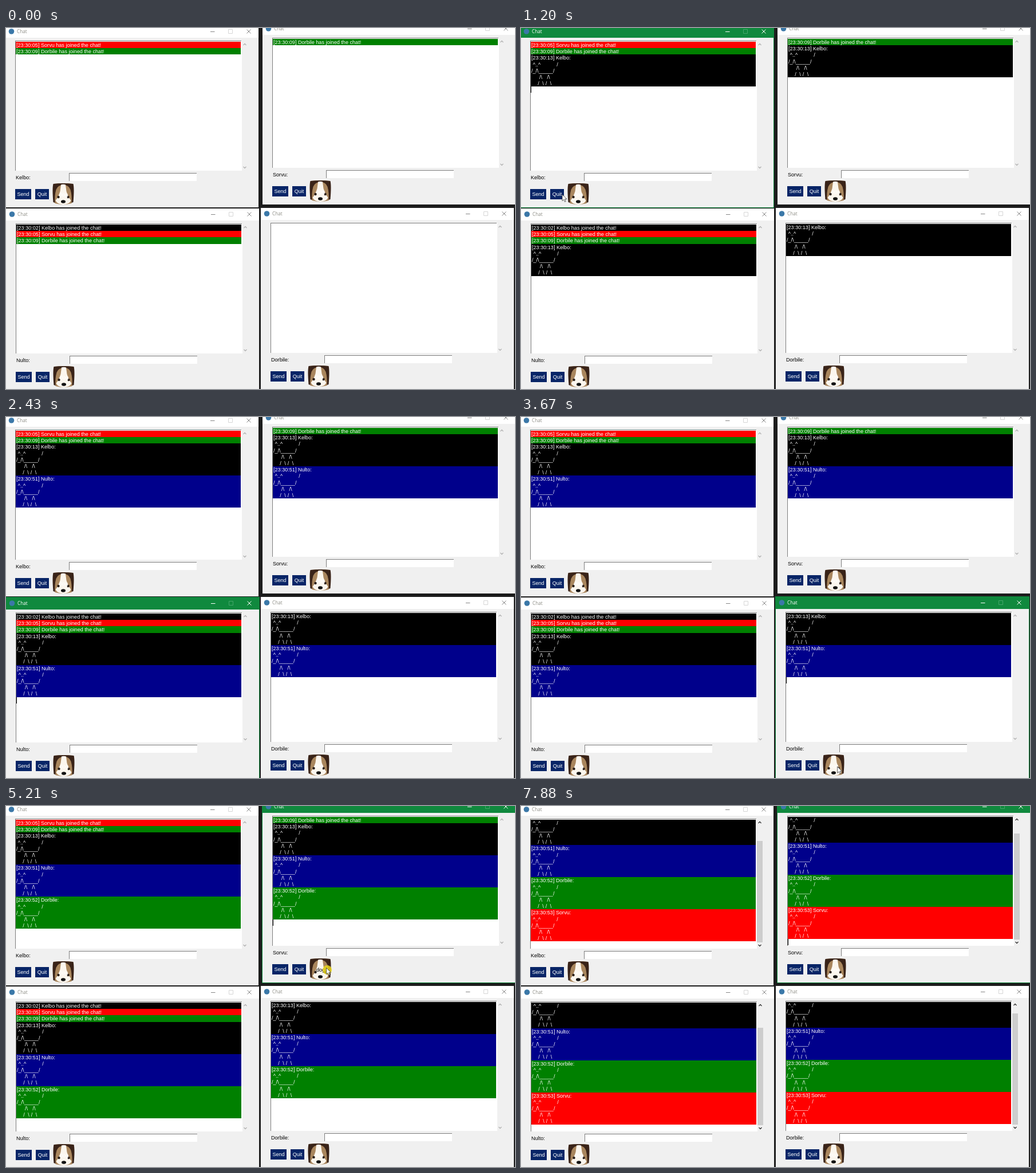
Animation, 889 px wide and 630 px high, one loop 8000 ms. Source, as an HTML page:

```html
<!DOCTYPE html>
<html lang="en">
<head>
<meta charset="utf-8">
<title>Chat</title>
<style>
  html, body { margin: 0; width: 100%; height: 100%; overflow: hidden; background: #1c1c1c; }
  #stage { display: block; width: 889px; height: 630px; }
  text { font: 9.1px "Liberation Sans", Arial, sans-serif; white-space: pre; }
  rect { shape-rendering: crispEdges; }
  .art { fill: #fff; word-spacing: .27px; }
  .light { fill: #fff; }
  .bar { fill: #fff; }
  .title { font: 8.2px "Open Sans", "Noto Sans", sans-serif; fill: #8f8f88; }
  .tool { fill: none; stroke: #858585; }
  .max { stroke: #d6d6d6; }
  .frame { fill: none; stroke: none; }
  .on .bar { fill: #10893e; }
  .on .title { fill: #fff; }
  .on .tool { stroke: #fff; }
  .on .max { stroke: #45a56b; }
  .on .frame { stroke: #10893e; }
  .edge { fill: none; stroke: #7d7d7d; shape-rendering: crispEdges; }
  .arrow { fill: none; stroke-width: 1.3; }
  .dog { fill: #fff; text-anchor: middle; }
  .down .dog { fill: #000; }
  .button { fill: #082567; }
  .mid { text-anchor: middle; fill: #fff; }
</style>
</head>
<body>
<svg id="stage" viewBox="0 0 889 630">
  <defs>
    <g id="face">
      <path fill="#a9865d" d="M2 1Q18.5-1 35 1L36 18L33 35Q18 39 4 35L1 18Z"/>
      <path fill="#392318" d="M1 1Q18.5-1 36 1Q38 9 36 33L33 34Q34 22 31 11Q28 3 19 2.5Q9 3 6 11Q3 22 4 34L1 33Q-1 9 1 1Z"/>
      <path fill="#fbf6ee" d="M14.5 2.5Q18.5 1 22.5 2.5L24 14Q27 24 32 30Q29 37 18.5 37Q8 37 5 30Q10 24 13 14Z"/>
      <circle cx="10" cy="24" r="2.2" fill="#2b2019"/>
      <circle cx="27" cy="24" r="2.2" fill="#2b2019"/>
      <ellipse cx="18.5" cy="32" rx="4" ry="2.7" fill="#111"/>
    </g>
  </defs>
  <g id="windows"></g>
  <g id="pointer">
    <circle id="click" cx="1.5" cy="3.5" r="8" fill="#e8d51c" opacity=".85"/>
    <path d="M0 0V11.2L2.6 8.8L4.4 12.8L6.2 12L4.5 8.1H8Z" fill="#fff" stroke="#222" stroke-width=".7"/>
  </g>
</svg>
<script>
const LOOP = 8000, ROW = 11.2, STEP = 77;
const $ = id => document.getElementById(id);

const users = {
  Kelbo: '#000', Sorvu: '#f00', Dorbile: '#008000', Nulto: '#00008b'
};
const joins = [['02', 'Kelbo'], ['05', 'Sorvu'], ['09', 'Dorbile']];
const posts = [
  { at: 1040, stamp: '13', name: 'Kelbo' },
  { at: 2430, stamp: '51', name: 'Nulto' },
  { at: 3740, stamp: '52', name: 'Dorbile' },
  { at: 5290, stamp: '53', name: 'Sorvu' }
];
const windows = [
  { name: 'Kelbo', x: 0, y: 0, skip: 1 },
  { name: 'Sorvu', x: 449, y: -5, skip: 2 },
  { name: 'Nulto', x: 1, y: 319, skip: 0 },
  { name: 'Dorbile', x: 446, y: 318, skip: 3 }
];
const presses = [
  { from: 890, to: 1040, name: 'Kelbo' },
  { from: 2350, to: 2430, name: 'Nulto' },
  { from: 3590, to: 3670, name: 'Dorbile' },
  { from: 5130, to: 5290, name: 'Sorvu' }
];
const caretOff = [[1580, 1890], [2890, 3210], [4220, 4520], [5760, 6080], [6690, 7010], [7560, 7880]];
// start, steps, from x y, to x y, hidden at
const moves = [
  [500, 4, 4, 300, 104, 287, 1040],
  [1040, 2, 104, 287, 72, 290.5, 1270],
  [1810, 1, 17.5, 617, 17.5, 617, 1890],
  [2040, 2, 84, 621, 98, 614.5, 2430],
  [3290, 1, 549, 622, 552, 614, 3510],
  [3510, 1, 552, 611, 552.5, 610, 4520],
  [4520, 7, 552.5, 605, 559.5, 282.5, 5380]
];
const dogArt = [' ^..^          /', '/_/\\_____/', '     /\\   /\\', '    /  \\ /  \\'];

const rect = (x, y, w, h, attr = '') => `<rect x="${x}" y="${y}" width="${w}" height="${h}" ${attr}/>`;
const text = (x, y, cls, str) => `<text x="${x}" y="${y}" class="${cls}">${str}</text>`;
const path = (cls, d) => `<path class="${cls}" d="${d}"/>`;
const line = (row, str, cls = 'light') => text(1, row * ROW + 9, cls, str);
const block = (row, count, name) =>
  rect(0, Math.round(row * ROW), 393, Math.round((row + count) * ROW) - Math.round(row * ROW), `fill="${users[name]}"`);

function history(win) {
  const seen = joins.slice(win.skip);
  win.rows = seen.length;
  const old = seen.map(([s, name], i) =>
    block(i, 1, name) + line(i, `[23:30:${s}] ${name} has joined the chat!`));
  const fresh = posts.map((p, i) => {
    const row = win.rows + i * 5;
    const art = dogArt.map((str, n) => line(row + 1 + n, str, 'art')).join('');
    return `<g class="post">${block(row, 5, p.name)}${line(row, `[23:30:${p.stamp}] ${p.name}:`)}${art}</g>`;
  });
  return old.concat(fresh).join('');
}

function markup(win) {
  return `<g transform="translate(${win.x} ${win.y})">
    ${rect(-1, -4, 442, 317, 'fill="#f0f0f0"')}
    ${rect(-1, -4, 442, 21, 'class="bar"')}
    ${rect(-1.5, -4.5, 443, 318, 'class="frame"')}
    <circle cx="9.5" cy="6" r="4.8" fill="#3b78a8"/>
    ${text(19, 9, 'title', 'Chat')}
    ${path('tool', 'M357 6.5H364.5M420.5 2.5L427.5 9.5M427.5 2.5L420.5 9.5')}
    ${path('tool max', 'M388.5 2.5H395.5V9.5H388.5Z')}
    ${rect(16, 22, 396, 227, 'fill="#fff"')}
    ${path('edge', 'M16.5 249V22.5H411')}
    <svg x="17" y="24" width="394" height="225"><g class="list">${history(win)}
      ${rect(0, 0, 1, 11, 'class="caret"')}</g></svg>
    ${rect(412, 0, 10, 0, 'class="thumb" fill="#cdcdcd"')}
    ${path('arrow', 'M414.5 30L417 27.5L419.5 30M414.5 242L417 244.5L419.5 242')}
    ${text(17, 264, '', win.name + ':')}
    ${rect(110, 253, 223, 14, 'fill="#fff"')}
    ${path('edge', 'M110.5 267V253.5H333')}
    ${rect(16, 281, 28, 18, 'class="button"')}${text(30, 293.3, 'mid', 'Send')}
    ${rect(51, 281, 24, 18, 'class="button"')}${text(63, 293.3, 'mid', 'Quit')}
    <use href="#face" x="81.5" y="271"/>${text(100.5, 293.5, 'dog', 'dog')}
  </g>`;
}

$('windows').innerHTML = windows.map(markup).join('');
windows.forEach((win, i) => {
  const el = win.el = $('windows').children[i];
  for (const part of ['list', 'caret', 'thumb', 'arrow']) win[part] = el.querySelector('.' + part);
  win.posts = el.querySelectorAll('.post');
});

const show = (el, yes) => el.setAttribute('visibility', yes ? 'inherit' : 'hidden');

function drawPointer(t, pressed) {
  const move = moves.filter(m => m[0] <= t).pop();
  const visible = move && t < move[6];
  show($('pointer'), visible);
  show($('click'), visible && pressed);
  if (!visible) return;
  const [start, steps, x0, y0, x1, y1] = move;
  const p = Math.min(1, Math.floor((t - start) / STEP) / steps);
  $('pointer').setAttribute('transform', `translate(${x0 + (x1 - x0) * p} ${y0 + (y1 - y0) * p})`);
}

function draw(t) {
  const last = presses.filter(p => p.from <= t).pop();
  const pressed = last && t < last.to;
  const count = posts.filter(p => p.at <= t).length;
  const full = count === posts.length;
  const blink = !caretOff.some(([a, b]) => t >= a && t < b);
  const fade = Math.max(0, Math.min(1, (Math.floor((t - 5380) / STEP) + 1) / 4));
  const grey = Math.round(178 - 128 * fade);

  for (const win of windows) {
    const active = !!last && last.name === win.name;
    win.el.classList.toggle('on', active);
    win.el.classList.toggle('down', active && pressed);
    win.posts.forEach((el, i) => show(el, i < count));
    const hidden = full ? win.rows + 1 : 0;
    win.list.setAttribute('transform', `translate(0 ${-Math.round(hidden * ROW)})`);
    win.caret.setAttribute('y', Math.round((win.rows + count * 5) * ROW));
    show(win.caret, active && blink);
    const top = 34 + 204 * hidden / (20 + hidden);
    win.thumb.setAttribute('y', top);
    win.thumb.setAttribute('height', full ? 237.5 - top : 0);
    win.arrow.setAttribute('stroke', `rgb(${grey},${grey},${grey})`);
  }
  drawPointer(t, pressed);
}

function tick() {
  draw(performance.now() % LOOP);
  requestAnimationFrame(tick);
}
tick();
</script>
</body>
</html>
```
